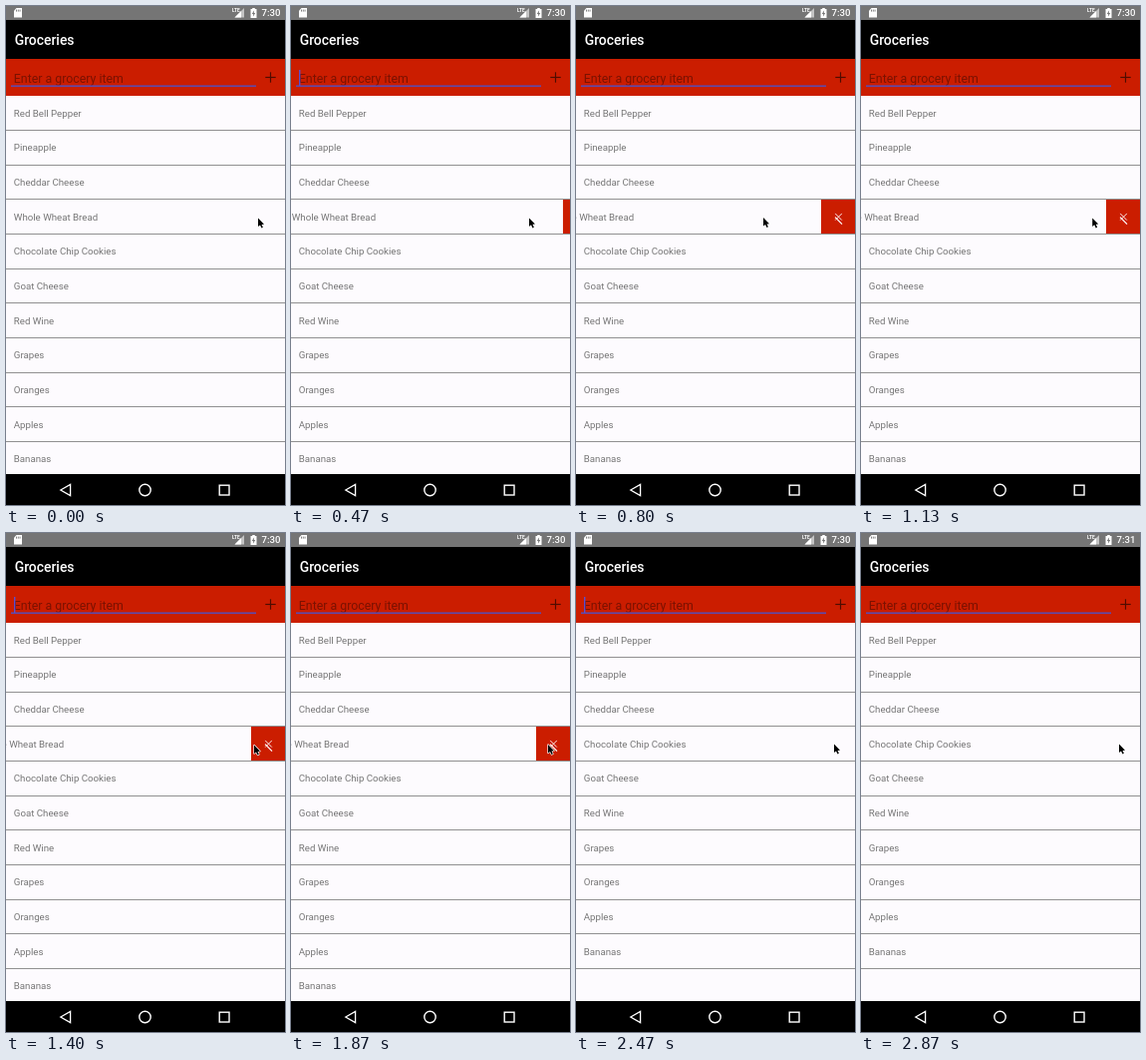
Animation of 280 by 500 pixels, one loop 2.94 s. Source, as an HTML page with a canvas:

```html
<!DOCTYPE html>
<html lang="en">
<head>
<meta charset="utf-8">
<title>Groceries</title>
<style>
html, body { margin: 0; width: 100%; height: 100%; overflow: hidden; background: #fdfbfe; }
canvas { display: block; width: 280px; height: 500px; }
</style>
</head>
<body>
<canvas id="stage" width="280" height="500"></canvas>
<script>
const ctx = document.getElementById('stage').getContext('2d');
const LOOP = 2940, ROW = 34.65, TOP = 90, REMOVED = 3, DELETE_AT = 2470;
const RED = '#cb1d00', PAPER = '#fdfbfe', GREY = '#757575';
const FONT = 'Roboto, "Noto Sans", sans-serif';
const ITEMS = ['Red Bell Pepper', 'Pineapple', 'Cheddar Cheese', 'Whole Wheat Bread',
  'Chocolate Chip Cookies', 'Goat Cheese', 'Red Wine', 'Grapes', 'Oranges', 'Apples', 'Bananas'];

// Pointer keys: time, x, y, easing into the key
const linear = u => u;
const speedUp = u => Math.pow(u, 1.85);
const smooth = u => u * u * (3 - 2 * u);
const PATH = [
  [0, 253, 212.5, linear], [270, 253, 212.5, linear], [730, 188, 212, speedUp],
  [800, 188, 212, linear], [1270, 244, 212.5, smooth], [1400, 249, 212.5, linear],
  [1800, 258, 212, smooth], [1870, 258, 212, linear], [2130, 259, 211.5, linear],
  [LOOP, 259, 211.5, linear]
];
const CARET_FLIPS = [70, 670, 1270, 1870, 2470, 2670];

function pointerAt(t) {
  const i = PATH.findIndex((k, n) => n && t <= k[0]);
  const a = PATH[i - 1], b = PATH[i];
  const u = b[3]((t - a[0]) / (b[0] - a[0]));
  return [a[1] + (b[1] - a[1]) * u, a[2] + (b[2] - a[2]) * u];
}

function rect(color, x, y, w, h) {
  ctx.fillStyle = color;
  ctx.fillRect(x, y, w, h);
}

function text(str, x, y, size, color, weight = 400) {
  ctx.font = `${weight} ${size}px ${FONT}`;
  ctx.fillStyle = color;
  ctx.fillText(str, x, y);
}

function trace(points, close) {
  ctx.beginPath();
  points.forEach(([x, y]) => ctx.lineTo(x, y));
  if (close) ctx.closePath();
}

function fill(points, color) {
  trace(points, true);
  ctx.fillStyle = color;
  ctx.fill();
}

function stroke(color, width) {
  ctx.strokeStyle = color;
  ctx.lineWidth = width;
  ctx.stroke();
}

function line(x1, y1, x2, y2, color, width) {
  trace([[x1, y1], [x2, y2]]);
  stroke(color, width);
}

function statusBar(t) {
  rect(GREY, 0, 0, 280, 14);
  fill([[10.5, 2], [16, 2], [16, 11.5], [8, 11.5], [8, 4.8]], '#fff');
  for (let x = 10; x < 15; x += 1.8) rect(GREY, x, 3.6, 0.9, 2);
  fill([[239, 2], [239, 11.5], [229.5, 11.5]], '#c4c4c4');
  fill([[236, 5], [236, 11.5], [229.5, 11.5]], '#fff');
  text('LTE', 227, 6, 4.8, '#fff', 700);
  rect('#fff', 245.5, 3, 6, 9);
  rect('#fff', 247.2, 2, 2.6, 1);
  fill([[249.1, 4.2], [246.8, 8], [248.2, 8], [247.9, 10.8], [250.2, 7], [248.8, 7]], GREY);
  text(t < 2530 ? '7:30' : '7:31', 256.5, 10.3, 9.6, '#fff', 500);
}

function header(t) {
  rect('#000', 0, 14, 280, 39);
  text('Groceries', 8.7, 39, 13.9, '#fff', 500);
  rect(RED, 0, 53, 280, 37);
  text('Enter a grocery item', 7.8, 76.5, 12.35, '#7b1200');
  rect('#6049a8', 5, 79.4, 246, 1.7);
  line(260.3, 71.5, 270.7, 71.5, '#4f0c00', 1.2);
  line(265.5, 66.3, 265.5, 76.7, '#4f0c00', 1.2);
  if (CARET_FLIPS.filter(f => f <= t).length % 2) rect('#5a4fd0', 8, 64, 1.4, 16);
}

function list(t, shift) {
  rect(PAPER, 0, TOP, 280, 379);
  const items = t < DELETE_AT ? ITEMS : ITEMS.filter((_, i) => i !== REMOVED);
  items.forEach((name, i) => {
    const y = TOP + i * ROW;
    const dx = t < DELETE_AT && i === REMOVED ? shift : 0;
    if (dx) {
      rect(RED, 246, y, 34, ROW);
      line(260, y + 17.7, 267, y + 10.7 + 14, '#fff', 0);
      line(260.2, y + 14, 266.8, y + 20.6, '#fff', 0.9);
      line(266.8, y + 14, 260.2, y + 20.6, '#fff', 0.9);
      rect(PAPER, 0, y, 280 - dx, ROW);
    }
    text(name, 7.8 - dx, y + 20.8, 9.7, GREY);
  });
  for (let i = 1; i <= Math.min(items.length, 10); i++) {
    rect('#919191', 0, Math.round(TOP + i * ROW - 0.6), 280, 1);
  }
}

function navBar() {
  rect('#000', 0, 469, 280, 31);
  trace([[54.8, 485], [64.6, 479.4], [64.6, 490.6]], true);
  stroke('#fff', 1.3);
  ctx.beginPath();
  ctx.arc(139.5, 485, 5.7, 0, Math.PI * 2);
  stroke('#fff', 1.4);
  ctx.strokeRect(214.2, 480.2, 9.8, 9.8);
}

function pointer(x, y) {
  const shape = [[0, 0], [0, 8.6], [2, 6.9], [3.5, 10], [4.9, 9.3], [3.5, 6.4], [6, 6.2]];
  trace(shape.map(([px, py]) => [x + px, y + py]), true);
  ctx.lineJoin = 'round';
  stroke('#fff', 1.3);
  ctx.lineJoin = 'miter';
  ctx.fillStyle = '#000';
  ctx.fill();
}

function draw(t) {
  const [x, y] = pointerAt(t);
  // The row follows the drag after a small slop, then stays open
  const shift = t < 730 ? Math.max(0, Math.min(34, 253 - x - 7)) : 34;
  list(t, shift);
  statusBar(t);
  header(t);
  navBar();
  pointer(x, y);
}

const start = performance.now();
function tick() {
  draw((performance.now() - start) % LOOP);
  requestAnimationFrame(tick);
}
tick();
</script>
</body>
</html>
```
